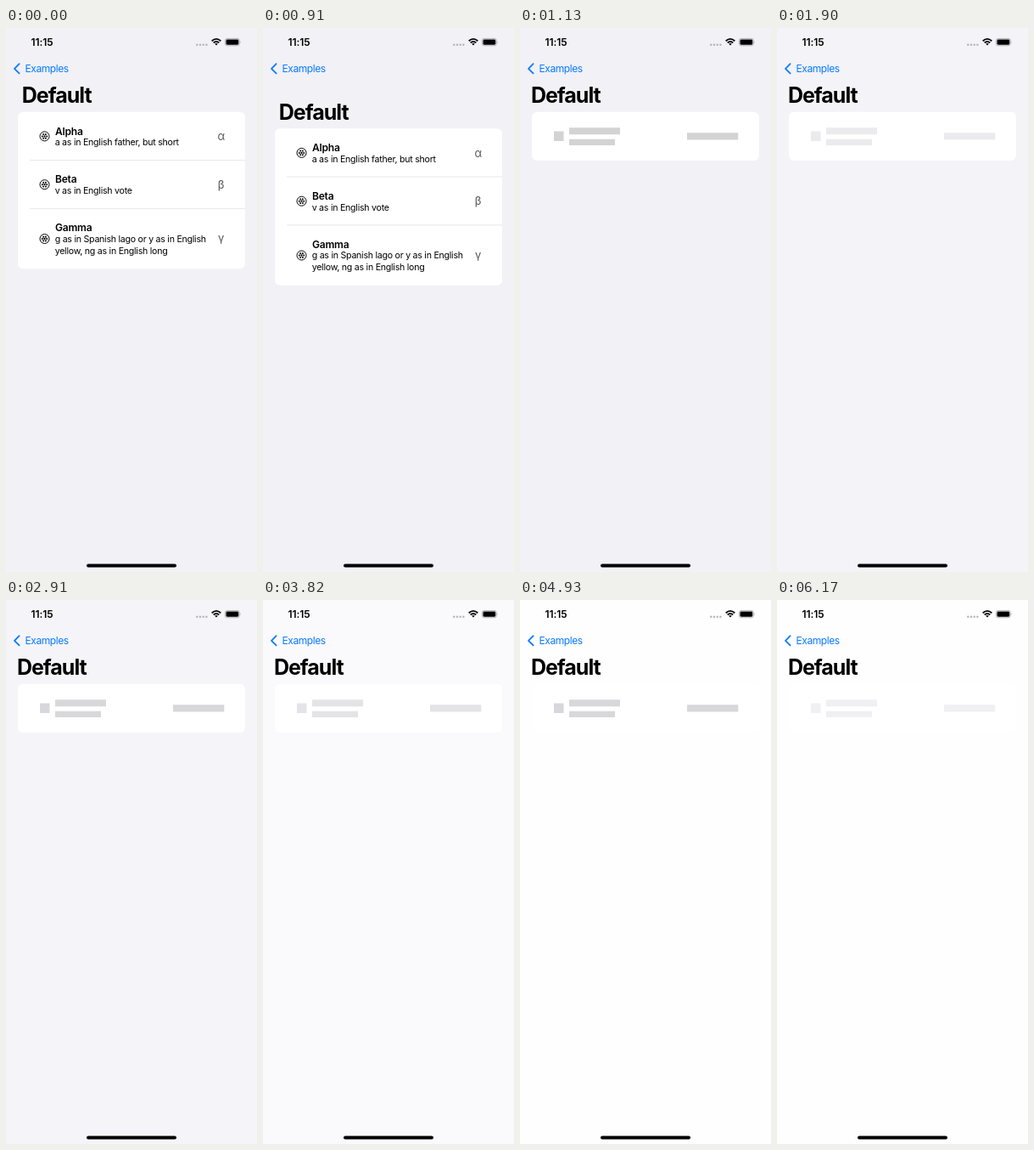
Recreate the animation shown at these times as an HTML page. Size 296 by 640 pixels, loop 8 s.

```html
<!DOCTYPE html>
<html lang="en">
<head>
<meta charset="utf-8">
<style>
  html, body { margin: 0; height: 100%; overflow: hidden; }
  svg { display: block; width: 296px; height: 640px; font: 10.6px Inter, Roboto, sans-serif; }
  .time { font-size: 12px; font-weight: 600; letter-spacing: -.1px; }
  .back { font-size: 12px; letter-spacing: -.45px; fill: #0a7aff; }
  .title { font-size: 25px; font-weight: 700; letter-spacing: -1px; }
  .name { font-size: 12px; font-weight: 600; letter-spacing: -.2px; }
  .note { letter-spacing: -.25px; }
  .greek { font-size: 13px; fill: #55555a; text-anchor: middle; }
</style>
</head>
<body>
<svg viewBox="0 0 296 640">
  <defs>
    <g id="icon">
      <circle r="5.5" fill="none" stroke="#000"/>
      <g id="dots"><circle r="1.15"/></g>
    </g>
  </defs>
  <rect id="bg" width="296" height="640"/>

  <text class="time" x="29.5" y="21">11:15</text>
  <g fill="#b4b4b8">
    <circle cx="225.3" cy="19.7" r="1.2"/><circle cx="229" cy="19.7" r="1.2"/>
    <circle cx="232.7" cy="19.7" r="1.2"/><circle cx="236.4" cy="19.7" r="1.2"/>
  </g>
  <g fill="none" stroke="#000" stroke-width="1.8">
    <path d="M242.7 15.2Q248 10.6 253.3 15.2M244.7 17.4Q248 14.6 251.3 17.4"/>
    <path d="M246.2 18.6Q248 17.2 249.8 18.6L248 20.6Z" fill="#000" stroke="none"/>
  </g>
  <rect x="258.4" y="12.4" width="17" height="8.4" rx="2.4" fill="none" stroke="#a5a5a8" stroke-width=".8"/>
  <rect x="259.5" y="13.5" width="14.8" height="6.2" rx="1.4"/>
  <path d="M276.4 15.2q1.2 1.4 0 2.8z" fill="#a5a5a8"/>

  <path d="M15.6 42.2L10 47.8L15.6 53.4" fill="none" stroke="#0a7aff" stroke-width="1.8" stroke-linecap="round" stroke-linejoin="round"/>
  <text class="back" x="22.6" y="52">Examples</text>

  <g id="page">
    <text id="title" class="title" y="88">Default</text>
    <rect id="card" x="14" y="98.7" width="268" rx="6" fill="#fff"/>
    <g id="list">
      <path d="M28 155.5H282M28 212.4H282" stroke="#e6e6e9" stroke-width=".9"/>
      <use href="#icon" x="45.5" y="127.4"/>
      <text class="name" x="58" y="125.5">Alpha</text>
      <text class="note" x="57.7" y="138">a as in English father, but short</text>
      <text class="greek" x="253.7" y="132">α</text>
      <use href="#icon" x="45.5" y="184.2"/>
      <text class="name" x="58" y="182.3">Beta</text>
      <text class="note" x="57.7" y="195">v as in English vote</text>
      <text class="greek" x="253.7" y="188.5">β</text>
      <use href="#icon" x="45.5" y="248"/>
      <text class="name" x="58" y="239.3">Gamma</text>
      <text class="note" x="57.7" y="251.8">g as in Spanish lago or y as in English</text>
      <text class="note" x="57.7" y="265.6">yellow, ng as in English long</text>
      <text class="greek" x="253.7" y="252">γ</text>
    </g>
    <path id="bones" d="M40 121.5h11.5v11.5h-11.5zM58 117.3h60v8h-60zM58 130.7h54v7.2h-54zM197 123.3h60.3v8.2h-60.3z"/>
  </g>
  <g id="spinner" transform="translate(148 83.5)" stroke-width="2.3" stroke-linecap="round"></g>
  <rect x="95" y="630.5" width="106" height="4" rx="2"/>
</svg>
<script>
const LOOP = 8000, LOADING = 1130;
const $ = id => document.getElementById(id);
const show = (id, on) => $(id).style.display = on ? '' : 'none';

$('dots').innerHTML += [0, 1, 2, 3, 4, 5].map(i =>
  `<circle cx="2.7" r="1" transform="rotate(${i * 60})"/>`).join('');
$('spinner').innerHTML = ['#858588', '#9d9da0', '#adadb0', '#c8c8cb', '#dcdce0'].map((c, i) =>
  `<path d="M0-4.8V-8.6" stroke="${c}" transform="rotate(${i * 45})"/>`).join('');

// Value of the last [start, value] step reached
const at = (steps, t) => steps.filter(s => s[0] <= t).pop()[1];
const pull = [[0, 0], [910, 19.5], [1020, 93.8], [LOADING, 0]];
const bones = [
  [0, '#d3d3d4'], [1690, '#e0e0e2'], [1900, '#ebebed'], [2680, '#e0e0e2'],
  [2910, '#d8d8da'], [3820, '#e4e4e7'], [4060, '#efeff1'], [4730, '#e4e4e7'],
  [4930, '#d8d8da'], [5950, '#e4e4e7'], [6170, '#f0f0f3']
];
const backdrop = [
  [0, '#f1f1f6'], [1690, '#f2f2f7'], [1900, '#f3f3f8'], [2680, '#f4f4f8'],
  [2910, '#f5f5f9'], [3820, '#fafafc'], [4060, '#fefefe']
];

function draw(t) {
  const loading = t >= LOADING;
  $('bg').setAttribute('fill', at(backdrop, t));
  $('bones').setAttribute('fill', at(bones, t));
  $('page').setAttribute('transform', `translate(0 ${at(pull, t)})`);
  $('title').setAttribute('x', t < 1020 ? 18.8 : 12.9);
  $('card').setAttribute('height', loading ? 57.3 : 184.6);
  show('list', !loading);
  show('bones', loading);
  show('spinner', t >= 1020 && !loading);
}

const start = performance.now();
function tick() {
  draw((performance.now() - start) % LOOP);
  requestAnimationFrame(tick);
}
tick();
</script>
</body>
</html>
```
